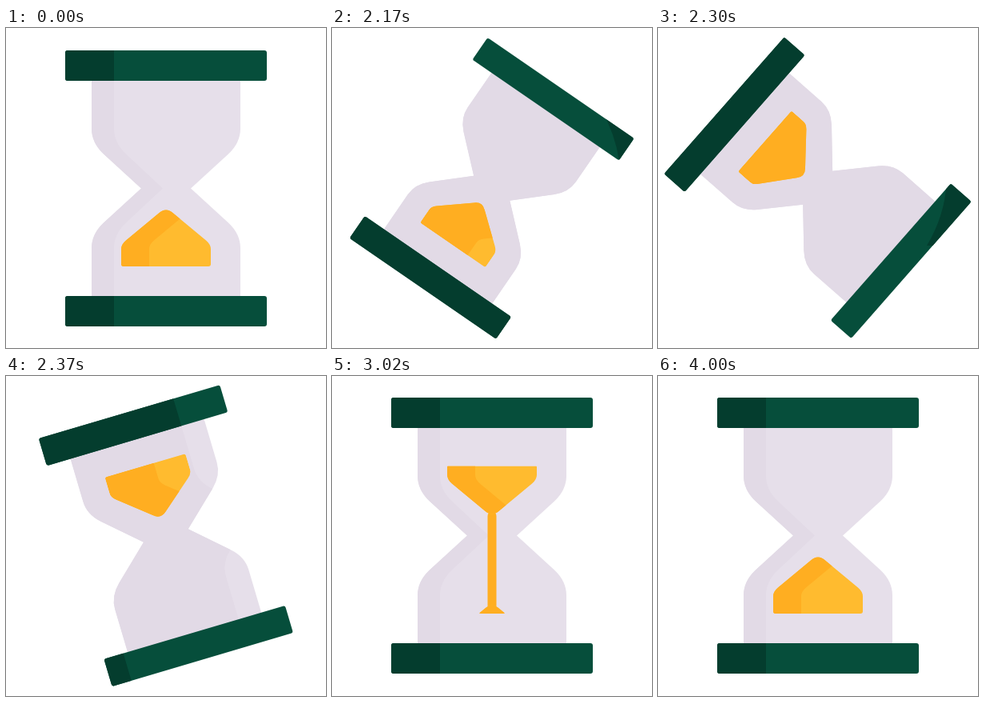
Animation of 400 by 400 pixels, one loop 4020 ms. Source, as an HTML page with a canvas:

```html
<!DOCTYPE html>
<html lang="en">
<head>
<meta charset="utf-8">
<title>Hourglass</title>
<style>
  html, body { margin: 0; width: 100%; height: 100%; overflow: hidden; background: #fff; }
  canvas { display: block; }
</style>
</head>
<body>
<canvas id="stage" width="400" height="400"></canvas>
<script>
const LOOP = 4020;
const BAR = ['#064e3b', '#043d2e'];
const GLASS = ['#e6dfea', '#e2dae6'];
const SAND = ['#ffbb2f', '#ffae21'];
const ctx = document.getElementById('stage').getContext('2d');

const clamp = (v, lo = 0, hi = 1) => Math.min(hi, Math.max(lo, v));
const smooth = u => u * u * (3 - 2 * u);
const cubicInOut = u => u < .5 ? 4 * u ** 3 : 1 - 4 * (1 - u) ** 3;

function scoped(draw) {
  ctx.save();
  draw();
  ctx.restore();
}

// All shapes are centred on the neck of the hourglass.
function glassPath() {
  const p = new Path2D();
  p.moveTo(-93, -136);
  p.lineTo(-93, -75);
  p.quadraticCurveTo(-93, -57, -78, -43);
  p.lineTo(-31, 0);
  p.lineTo(-78, 43);
  p.quadraticCurveTo(-93, 57, -93, 75);
  p.lineTo(-93, 136);
  p.lineTo(93, 136);
  p.lineTo(93, 75);
  p.quadraticCurveTo(93, 57, 78, 43);
  p.lineTo(31, 0);
  p.lineTo(78, -43);
  p.quadraticCurveTo(93, -57, 93, -75);
  p.lineTo(93, -136);
  p.closePath();
  return p;
}

function glassShade(dx) {
  const p = new Path2D();
  p.moveTo(-200, -140);
  p.lineTo(dx - 93, -140);
  p.lineTo(dx - 93, -75);
  p.quadraticCurveTo(dx - 93, -57, dx - 78, -43);
  p.lineTo(dx - 32, 0);
  p.lineTo(dx - 78, 43);
  p.quadraticCurveTo(dx - 93, 57, dx - 93, 75);
  p.lineTo(dx - 93, 140);
  p.lineTo(-200, 140);
  return p;
}

function barPath(side) {
  const p = new Path2D();
  p.roundRect(-126, side < 0 ? -172.5 : 134.5, 252, 38, 3);
  return p;
}

function pilePath() {
  const p = new Path2D();
  p.moveTo(-56, 98);
  p.lineTo(-56, 76);
  p.quadraticCurveTo(-56, 70, -50, 65);
  p.lineTo(-9, 31);
  p.quadraticCurveTo(0, 23, 9, 31);
  p.lineTo(50, 65);
  p.quadraticCurveTo(56, 70, 56, 76);
  p.lineTo(56, 98);
  return p;
}

function pileShade(dx) {
  const p = new Path2D();
  p.moveTo(-99, 99);
  p.lineTo(dx - 56, 99);
  p.lineTo(dx - 56, 76);
  p.quadraticCurveTo(dx - 56, 70, dx - 50, 65);
  p.lineTo(dx, 23.5);
  p.lineTo(-99, 23);
  return p;
}

function shaded(shape, shade, [light, dark]) {
  ctx.fillStyle = light;
  ctx.fill(shape);
  scoped(() => {
    ctx.clip(shape);
    ctx.fillStyle = dark;
    ctx.fill(shade);
  });
}

function edgeShade(x) {
  const p = new Path2D();
  p.rect(-200, -200, x + 200, 400);
  return p;
}

// Dark tip on the right of the stage while the glass is turning.
function drawTip(bar) {
  scoped(() => {
    ctx.clip(bar);
    ctx.resetTransform();
    ctx.fillStyle = BAR[1];
    ctx.beginPath();
    ctx.moveTo(336, 100);
    ctx.quadraticCurveTo(385, 190, 336, 272);
    ctx.lineTo(400, 272);
    ctx.lineTo(400, 100);
    ctx.fill();
  });
}

// side: 1 bottom, -1 top; drop lowers the pile, cut trims its flat edge.
function drawSand(side, drop, cut, shade) {
  const half = Math.min(56 - .22 * drop, 50 - (cut - 32.5) * 1.206);
  if (cut >= 71 || half <= 0) return;
  scoped(() => {
    ctx.scale(1, side);
    ctx.translate(0, drop);
    ctx.beginPath();
    ctx.roundRect(-half, 0, 2 * half, 97.5 - cut, Math.max(0, 3 - (cut - drop) / 5));
    ctx.clip();
    shaded(pilePath(), pileShade(35 + shade), SAND);
  });
}

function drawStream(t) {
  const tip = Math.min(97.5, (t - 2570) * .5 - 4.5);
  const tail = Math.max(0, (t - 3850) * .5) - 30;
  if (t < 2534 || tail > 32) return;
  ctx.fillStyle = SAND[1];
  ctx.beginPath();
  ctx.roundRect(-5.5, tail, 11, tip - tail, 5.5);
  ctx.fill();
}

function render(t) {
  const deg = 180 * cubicInOut(clamp((t - 1965) / 567));
  const turned = deg > 90;
  const tilt = Math.min(deg, 180 - deg);
  const sweep = clamp(tilt / 30);
  const rad = deg * Math.PI / 180;
  const sin = Math.sin(rad), cos = Math.abs(Math.cos(rad));
  // Shrink so that the turning corners stay on the stage.
  const size = Math.min(1, 188 / (172 * cos + 126 * sin), 199 / (126 * cos + 172 * sin));

  ctx.fillStyle = '#fff';
  ctx.fillRect(0, 0, 400, 400);
  scoped(() => {
    ctx.translate(200, 200);
    ctx.rotate(turned ? rad - Math.PI : rad);
    ctx.scale(size, size);
    ctx.translate(0, turned ? -.5 : .5);

    shaded(glassPath(), glassShade(28 + 230 * sweep), GLASS);
    const first = barPath(turned ? 1 : -1);
    shaded(first, edgeShade(-65 - 62 * sweep), BAR);
    if (sweep === 1) drawTip(first);
    shaded(barPath(turned ? -1 : 1), edgeShade(-65 + 230 * sweep), BAR);

    const fallen = turned ? smooth(clamp((t - 2750) / 1100)) : 1;
    const shade = tilt * (turned ? 2 : 1.35);
    drawStream(t);
    drawSand(-1, 0, 71 * fallen, shade);
    drawSand(1, 71 * (1 - fallen), 71 * (1 - fallen), shade);
  });
}

const start = performance.now();
function tick() {
  render((performance.now() - start) % LOOP);
  requestAnimationFrame(tick);
}
tick();
</script>
</body>
</html>
```
